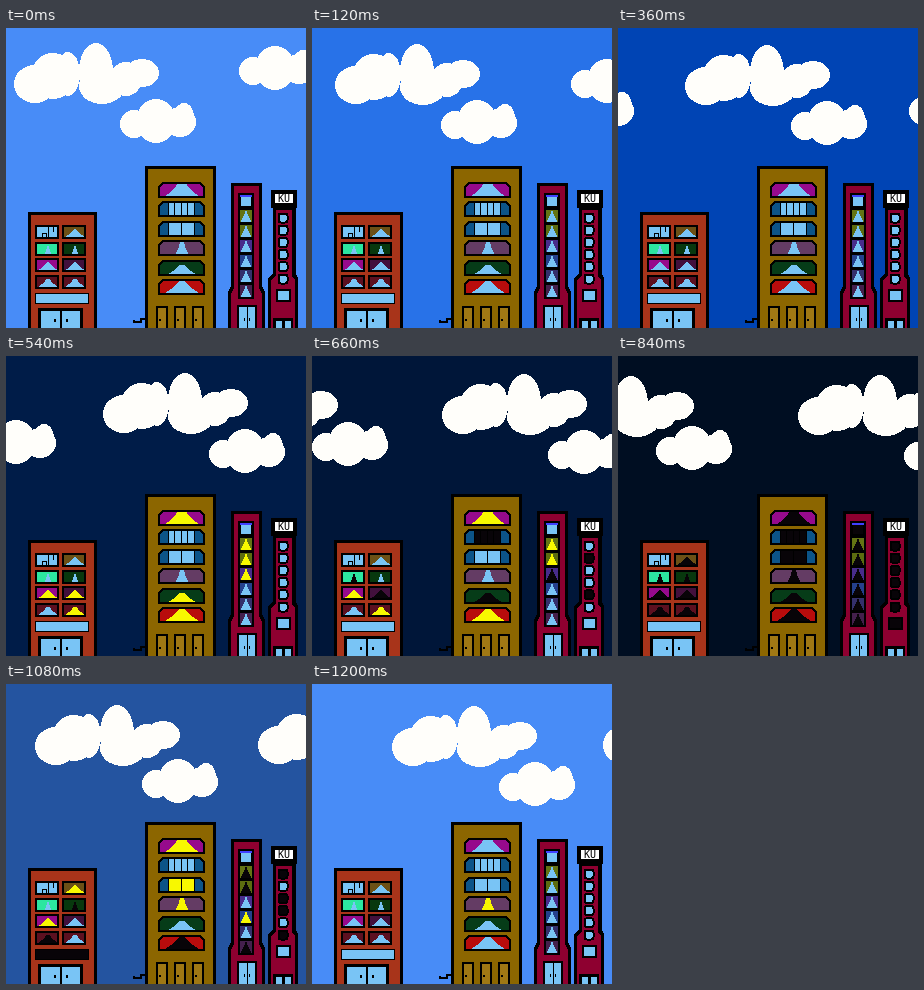
An HTML page that plays this animation: 300x300 px, repeating every 1.26 s.

```html
<!DOCTYPE html>
<html lang="en">
<head>
<meta charset="utf-8">
<title>City day and night</title>
<style>
html, body { margin: 0; width: 100%; height: 100%; overflow: hidden; }
svg { display: block; width: 100vw; height: 100vh; }
text { font: 10px "DejaVu Sans Mono", monospace; }
</style>
</head>
<body>
<svg id="stage" viewBox="0 0 300 300" shape-rendering="crispEdges"></svg>
<script>
const STEP = 60, COUNT = 21;
const stage = document.getElementById('stage');
const GLASS = { b: '#79c4f5', y: '#f8f800', d: '#080408' };
const BRICK = '#a8341a', GOLD = '#8c6600', WINE = '#8e0030';
const LIT = 'class="lit"', EDGE = 'stroke="#000" stroke-width="2"';

const rect = (x, y, w, h, fill, extra = '') =>
  `<rect x="${x}" y="${y}" width="${w}" height="${h}" fill="${fill}" ${extra}/>`;
const path = (d, fill, extra = '') => `<path d="${d}" fill="${fill}" ${extra}/>`;
const line = (d, w = 1) => path(d, 'none', `stroke="#000" stroke-width="${w}"`);
const puff = (cx, cy, rx, ry) => `<ellipse cx="${cx}" cy="${cy}" rx="${rx}" ry="${ry}"/>`;

const bigCloud = puff(21, 41, 21, 19) + puff(39, 33, 22, 23) + puff(54, 31, 12, 22) +
  puff(82, 28, 17, 28) + puff(88, 43, 23, 18) + puff(112, 36, 16, 17) + puff(128, 30, 17, 14);
const smallCloud = puff(14, 25, 14, 14) + puff(36, 22, 20, 22) + puff(60, 23, 16, 15) + puff(64, 18, 10, 14);

// Key steps shared by sky, clouds and panes
const KEYS = [0, 4, 6, 9, 14, 16, 20];
const drift = [8, 37, 67, 97, 180, 213, 291];
const follow = [-150, -110, -60, -26, 38, 85, 187];
const clouds = [
  { art: bigCloud, x: drift, y: [15, 20] },
  { art: smallCloud, x: drift.map(x => x + 106), y: [71, 76] },
  { art: smallCloud, x: [233, 284, 291, 310, 310, 310, 310], y: [18, 150] },
  { art: smallCloud, x: follow, y: [52, 78] },
  { art: bigCloud, x: follow.map(x => x - 107 - (x < 0 ? 20 : 0)), y: [15, 22] }
];
const day = [72, 140, 247], dusk = [0, 28, 72];
const sky = [day, [8, 88, 216], [0, 68, 180], dusk, [0, 14, 34], dusk, day];

// b daylight, y lit, d dark; one letter per pane, building by building
const noon = 'b'.repeat(29);
const lights = [noon, noon, noon,
  'bbbbyybyb' + 'ybbbyy' + 'byyybbb' + 'bbbbbbb',
  'bdddddddb' + 'dddddd' + 'ddddddd' + 'ddddddd',
  'bybdydddd' + 'ydyyyd' + 'yddyydd' + 'ddddddd',
  'bbbbbbbbb' + 'bbbybb' + 'bbbbbbb' + 'bbbbbbb'];

// Opening between two drapes: flat-topped peak on the sill
function peak(m, base, spread, tall, tip) {
  const s = spread / 2, t = tip / 2;
  return path(`M${m - s} ${base}Q${m - s * .5} ${base - tall * .4} ${m - t} ${base - tall}` +
    `H${m + t}Q${m + s * .5} ${base - tall * .4} ${m + s} ${base}Z`, GLASS.b, LIT);
}

function doors(x, y, w, knob) {
  const m = x + w / 2;
  return rect(x - 3, y - 3, w + 6, 303 - y, '#000') + rect(x, y, w, 300 - y, GLASS.b) +
    line(`M${m} ${y}V300`, 2) +
    rect(m - knob - 2, 291, 2, 3, '#000') + rect(m + knob, 291, 2, 3, '#000');
}

function brickHouse() {
  const tints = ['#79c4f5', '#6c5016', '#2ce6a0', '#08380e', '#960a8c', '#42103c', '#5c1020', '#5c1020'];
  let s = rect(22, 184, 69, 116, '#000') + rect(25, 187, 63, 113, BRICK);
  tints.forEach((tint, i) => {
    const row = i >> 1, x = i % 2 ? 57 : 30, y = 198 + row * 16.6;
    s += rect(x, y, 22, 12, i ? tint : GLASS.b, (i ? '' : LIT) + EDGE.padStart(EDGE.length + 1));
    s += i ? peak(x + 12, y + 11, row === 1 ? 6 : 19, 8, 2) : line('M36 209V205H40V209M42 199V209M47 199V204');
  });
  s += rect(29, 265, 53, 10, GLASS.b, LIT + ' stroke="#000"');
  return s + doors(35, 283, 39, 5);
}

function goldTower() {
  const tints = ['#960a8c', '#0c5488', '#0c5488', '#643c64', '#063c18', '#b80c0c'];
  let s = rect(139, 138, 71, 162, '#000') + rect(142, 141, 65, 159, GOLD);
  tints.forEach((tint, i) => {
    const y = 155 + i * 19.4;
    s += path(`M153 ${y + 14}v-10l4 -4h37l4 4v10z`, tint, EDGE);
    if (i === 1 || i === 2) {
      const gap = i === 1 ? 6.5 : 13;
      s += rect(162, y + 1, 26, 12, GLASS.b, LIT);
      for (let x = 162; x <= 188; x += gap) s += line(`M${x} ${y}v14`);
    } else s += peak(176, y + 13, i === 3 ? 13 : i === 4 ? 26 : 34, i === 4 ? 9 : 12, i === 0 ? 9 : 4);
  });
  for (let x = 151; x < 190; x += 18)
    s += rect(x, 279, 10, 24, '#a07814', EDGE) + rect(x + 2, 291, 2, 2, '#000');
  return s + line('M128 292V294H135V291H139', 2);
}

function wineTower() {
  const tints = ['#4040ff', '#647414', '#5c6c10', '#482c8c', '#24408c', '#34306c', '#44204c'];
  let s = path('M225 155H256V258L259 264V300H222V264L225 258Z', '#000') +
    path('M228 158H253V260L256 266V300H225V266L228 260Z', WINE) + rect(232, 165, 16, 106, '#000');
  tints.forEach((tint, i) => {
    const y = 167 + i * 15;
    s += rect(234, y, 12, i ? 12 : 2, tint);
    s += i ? peak(240, y + 12, 11, 11, 1) : rect(235, y + 2, 10, 9, GLASS.b, LIT);
  });
  return s + rect(231, 277, 20, 23, '#000') + rect(233, 279, 16, 21, GLASS.b) +
    line('M241 279V300') + rect(238, 290, 1, 3, '#000') + rect(243, 290, 1, 3, '#000');
}

function signTower() {
  let s = path('M267 178H290V246L292 250V300H262V250L267 246Z', '#000') +
    path('M270 182H286V248L289 252V300H265V252L270 248Z', WINE) +
    rect(265, 162, 26, 18, '#000') + rect(269, 166, 18, 9, '#fff') +
    '<text x="278" y="174" text-anchor="middle">KU</text>';
  for (let i = 0; i < 6; i++)
    s += rect(272.5, 185.5 + i * 12.2, 9, 9, GLASS.b, `${LIT} rx="2.5" ${EDGE}`);
  s += rect(271, 262, 13, 11, GLASS.b, `${LIT} ${EDGE}`);
  return s + rect(267, 290, 20, 10, '#000') + rect(270, 293, 6, 7, GLASS.b) + rect(279, 293, 6, 7, GLASS.b);
}

stage.innerHTML = rect(0, 0, 300, 300, '#488cf7', 'id="sky"') +
  clouds.map(c => `<g class="cloud" fill="#fffefa">${c.art}</g>`).join('') +
  brickHouse() + goldTower() + wineTower() + signTower();

const skyEl = document.getElementById('sky');
const cloudEls = [...stage.querySelectorAll('.cloud')];
const panes = [...stage.querySelectorAll('.lit')];
const mix = (a, b, u) => Math.round(a + (b - a) * u);

function draw(ms) {
  const n = Math.floor(ms / STEP) % COUNT;
  const k = Math.min(KEYS.length - 2, KEYS.findLastIndex(key => key <= n));
  const u = (n - KEYS[k]) / (KEYS[k + 1] - KEYS[k]);
  skyEl.setAttribute('fill', `rgb(${sky[k].map((v, i) => mix(v, sky[k + 1][i], u))})`);
  clouds.forEach(({ x, y }, i) => {
    const at = [mix(x[k], x[k + 1], u), mix(y[0], y[1], n / (COUNT - 1))];
    cloudEls[i].setAttribute('transform', `translate(${at})`);
  });
  // Panes switch one after another within each span
  panes.forEach((p, i) => {
    const turned = u > 0 && u >= .2 + .8 * ((i * .618) % 1);
    p.setAttribute('fill', GLASS[lights[u === 1 || turned ? k + 1 : k][i]]);
  });
}

let start;
function tick(now) {
  start ??= now;
  draw(now - start);
  requestAnimationFrame(tick);
}
draw(0);
requestAnimationFrame(tick);
</script>
</body>
</html>
```
